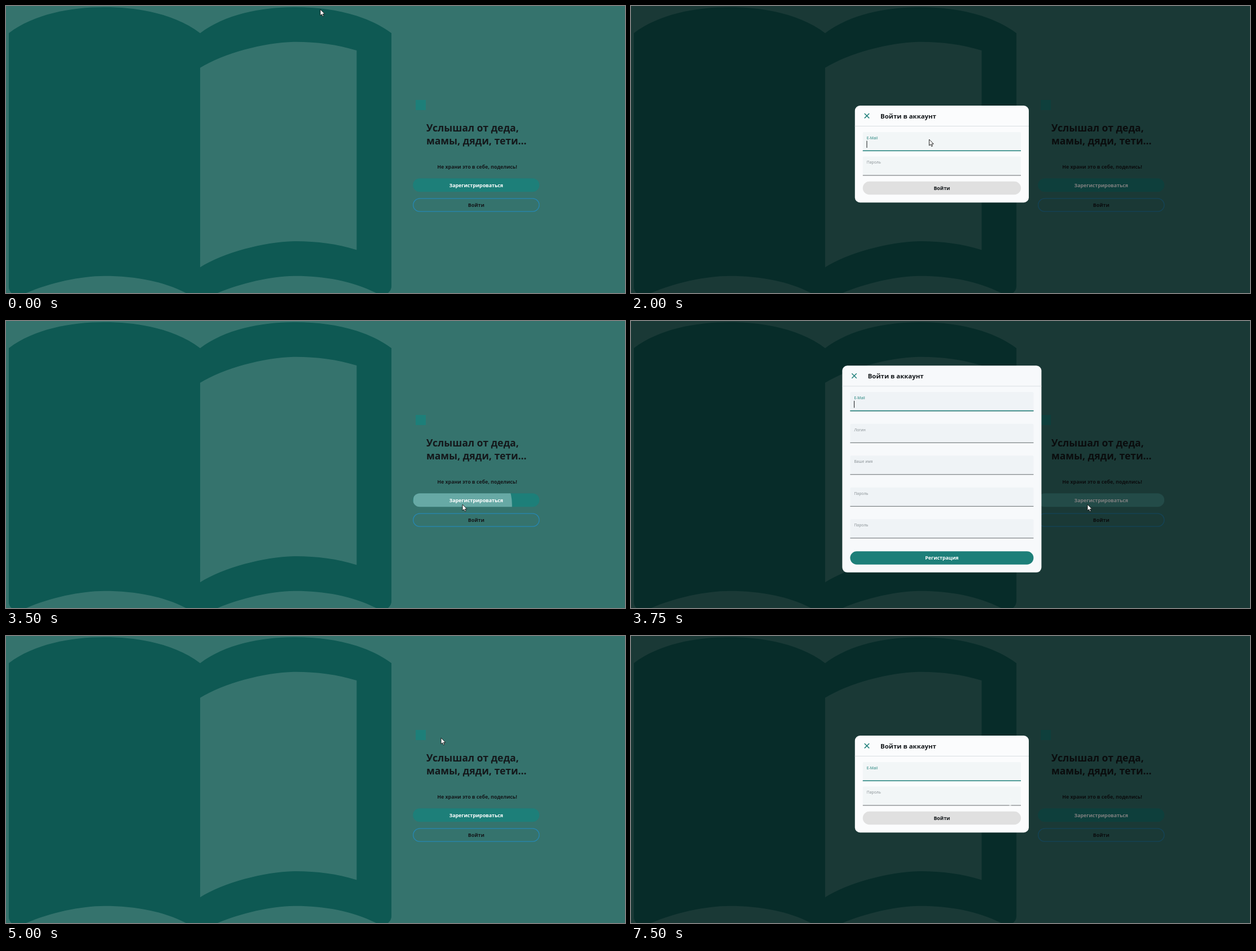
Write an HTML page that moves like this. It is 1097 by 510 pixels and loops after 8 s.

```html
<!DOCTYPE html>
<html lang="ru">
<head>
<meta charset="utf-8">
<style>
  html, body { margin: 0; width: 100%; height: 100%; overflow: hidden; background: #35736d; }
  svg { display: block; width: 1097px; height: 510px; }
  text { font-family: "Open Sans", "Noto Sans", sans-serif; fill: #14181b; }
  .bold { font-weight: 700; font-size: 8.8px; text-anchor: middle; }
  .head { font-weight: 700; font-size: 17.5px; }
  .title { font-weight: 700; font-size: 11.4px; }
  .label { font-size: 6.8px; fill: #858d91; }
  .white { fill: #fff; }
  .teal { fill: #1d7f79; }
</style>
</head>
<body>
<svg viewBox="0 0 1097 510">
  <defs>
    <clipPath id="upClip"><rect x="721.2" y="306.3" width="224" height="24" rx="12"/></clipPath>
    <clipPath id="inClip"><rect x="721.5" y="342.5" width="223" height="22.5" rx="11.2"/></clipPath>
  </defs>
  <rect width="1097" height="510" fill="#35736d"/>
  <path fill="#0e5953" transform="translate(-25.8 -136.7) scale(30.82)" d="M21 5c-1.11-.35-2.33-.5-3.5-.5-1.95 0-4.05.4-5.5 1.5-1.45-1.1-3.55-1.5-5.5-1.5S2.45 4.9 1 6v14.65c0 .25.25.5.5.5.1 0 .15-.05.25-.05C3.1 20.45 5.05 20 6.5 20c1.95 0 4.05.4 5.5 1.5 1.35-.85 3.8-1.5 5.5-1.5 1.65 0 3.35.3 4.75 1.05.1.05.15.05.25.05.25 0 .5-.25.5-.5V6c-.6-.45-1.25-.75-2-1zm0 13.5c-1.1-.35-2.3-.5-3.5-.5-1.7 0-4.15.65-5.5 1.5V8c1.35-.85 3.8-1.5 5.5-1.5 1.2 0 2.4.15 3.5.5v11.5z"/>
  <rect class="teal" x="726" y="167" width="18" height="18"/>
  <text class="head" x="745" y="222.5">Услышал от деда,</text>
  <text class="head" x="745" y="245.5">мамы, дяди, тети…</text>
  <text class="bold" x="835" y="289">Не храни это в себе, поделись!</text>
  <rect class="teal" x="721.2" y="306.3" width="224" height="24" rx="12"/>
  <rect id="signIn" x="721.7" y="342.2" width="223.2" height="23" rx="11.5" fill="none" stroke-width="1.3"/>
  <circle id="ripple"/>
  <text class="bold white" x="833.3" y="321.7">Зарегистрироваться</text>
  <text class="bold" x="833.3" y="356.8">Войти</text>
  <rect id="shade" width="1097" height="510"/>
  <g id="dialogs"></g>
  <path id="arrow" d="M0 0V11L2.5 8.7 4.3 12.6 6 11.8 4.3 8.1H7.8Z" fill="#fff" stroke="#111" stroke-width=".9"/>
  <path id="beam" d="M-2 -6H2M0 -6V6M-2 6H2" fill="none" stroke="#f4f7f7" stroke-width="1"/>
</svg>
<script>
const $ = id => document.getElementById(id);
const set = (el, attrs) => { for (const k in attrs) el.setAttribute(k, attrs[k]); };
const clamp = v => Math.max(0, Math.min(1, v));
const smooth = k => k * k * (3 - 2 * k);

// Builds a form dialog and returns its animated parts
function makeDialog({ x, y, w, h, paper, fill, labels, gap, button, buttonFill, buttonClass }) {
  const left = x + 14, width = w - 28, top = y + 47;
  const field = (name, i) => {
    const t = top + i * gap;
    return `<path d="M${left} ${t + 33}v-31q0-2 2-2h${width - 4}q2 0 2 2v31z" fill="${fill}"/>
      <rect x="${left}" y="${t + 33}" width="${width}" height="1" fill="#62696b"/>
      <text class="label ${i ? '' : 'teal'}" x="${left + 7}" y="${t + 12.8}">${name}</text>`;
  };
  const buttonY = y + h - 37.5;
  const g = document.createElementNS('http://www.w3.org/2000/svg', 'g');
  g.innerHTML = `<rect x="${x}" y="${y}" width="${w}" height="${h}" rx="9" fill="${paper}"/>
    <path d="M${x + 17} ${y + 14}l8.4 8.4m0-8.4l-8.4 8.4" stroke="#1d7f79" stroke-width="1.5"/>
    <text class="title" x="${x + 45.3}" y="${y + 22.9}">Войти в аккаунт</text>
    <rect x="${x}" y="${y + 36}" width="${w}" height="1" fill="#d9dfe2"/>
    ${labels.map(field).join('')}
    <rect class="line teal" y="${top + 32.5}" height="1.5"/>
    <rect class="caret" x="${left + 6.7}" y="${top + 15.5}" width="1" height="12.5" fill="#14181b"/>
    <rect x="${left}" y="${buttonY}" width="${width}" height="23.5" rx="11.7" fill="${buttonFill}"/>
    <text class="bold ${buttonClass}" x="${x + w / 2}" y="${buttonY + 15}">${button}</text>`;
  $('dialogs').append(g);
  return { g, left, width, line: g.querySelector('.line'), caret: g.querySelector('.caret') };
}

const login = makeDialog({
  x: 396.8, y: 177, w: 308.2, h: 172.2, paper: '#fbfcfd', fill: '#f2f6f7',
  labels: ['E-Mail', 'Пароль'], gap: 43.5,
  button: 'Войти', buttonFill: '#e0e0e0', buttonClass: ''
});
const register = makeDialog({
  x: 374.4, y: 79.3, w: 353, h: 367.5, paper: '#f7f9fb', fill: '#eff3f6',
  labels: ['E-Mail', 'Логин', 'Ваше имя', 'Пароль', 'Пароль'], gap: 56.5,
  button: 'Регистрация', buttonFill: '#1d7f79', buttonClass: 'white'
});

// Each visit: button press, dialog opening on release, closing
const onSignIn = { dialog: login, y: 358, ink: '#000', alpha: .23, clip: 'url(#inClip)' };
const onSignUp = { dialog: register, y: 327, ink: '#fff', alpha: .33, clip: 'url(#upClip)' };
const visits = [
  { ...onSignIn, x: 844, r: 125, press: 1238, open: 1510, close: 2600 },
  { ...onSignUp, x: 809, r: 137, press: 3300, open: 3510, close: 4850 },
  { ...onSignIn, x: 790, r: 157, press: 5694, open: 5805, close: Infinity }
];

// Pointer route: time, x, y
const route = [
  [0, 557, 6], [1250, 844, 357], [1500, 844, 357], [2250, 418, 195], [2750, 778, 235],
  [3250, 809, 326], [3750, 809, 326], [4250, 395, 97], [4500, 395, 97], [5000, 771, 181],
  [5750, 790, 357], [6000, 790, 357], [7000, 672, 295], [8000, 672, 295]
];

function pointerAt(t) {
  const i = route.findIndex(p => p[0] > t);
  const [t0, x0, y0] = route[i - 1], [t1, x1, y1] = route[i];
  const k = smooth((t - t0) / (t1 - t0));
  return `translate(${x0 + (x1 - x0) * k} ${y0 + (y1 - y0) * k})`;
}

function drawRipple(t, { x, y, r, press, open, ink, alpha, clip }) {
  const k = clamp((t - press) / 550);
  set($('ripple'), {
    cx: x, cy: y, r: r * smooth(1 - (1 - k) ** 2), fill: ink, 'clip-path': clip,
    'fill-opacity': alpha * (1 - clamp((t - open) / 550))
  });
}

function drawDialog(t, { dialog, open, close }) {
  const shown = clamp(Math.min((t - open) / 240, (close - t) / 200));
  const grow = clamp((t - open) / 220);
  set($('shade'), { opacity: shown / 2 });
  dialog.g.style.display = shown ? '' : 'none';
  set(dialog.g, { opacity: shown });
  set(dialog.line, { x: dialog.left + dialog.width * (1 - grow) / 2, width: dialog.width * grow });
  set(dialog.caret, { opacity: (t - open) % 1000 < 500 ? 1 : 0 });
}

function draw(t) {
  const visit = visits.findLast(v => t >= v.press) || visits[0];
  login.g.style.display = register.g.style.display = 'none';
  drawRipple(t, visit);
  drawDialog(t, visit);
  set($('signIn'), { stroke: t >= 1250 && t < 1750 ? '#30756e' : '#2688b4' });

  const overText = t === 2750 || t >= 7000;
  $('arrow').style.display = overText ? 'none' : '';
  $('beam').style.display = overText ? '' : 'none';
  set($(overText ? 'beam' : 'arrow'), { transform: pointerAt(t) });
}

// The picture advances four times a second
const start = performance.now();
function tick() {
  draw(Math.floor((performance.now() - start) % 8000 / 250) * 250);
  requestAnimationFrame(tick);
}
tick();
</script>
</body>
</html>
```
